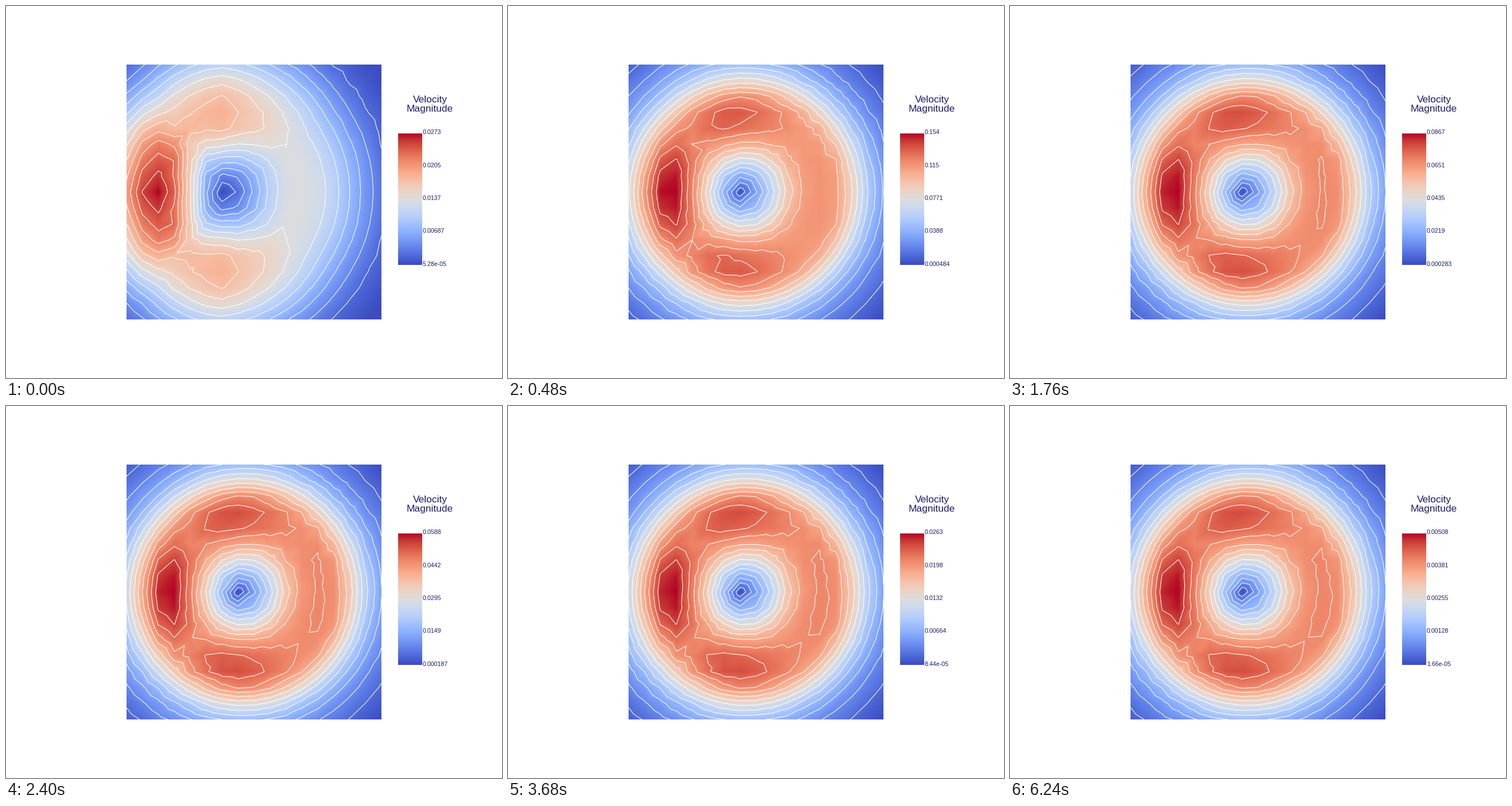
A matplotlib script that plays this animation: 864 by 648 pixels, repeating every 6400 ms.

```python
import numpy as np
import matplotlib.pyplot as plt
from matplotlib.animation import FuncAnimation
from matplotlib.tri import Triangulation

W, H, DPI = 864, 648, 100
FRAMES, INTERVAL = 40, 160
LEFT, RIGHT, TOP, BOTTOM = 210, 654, 102, 546
CELLS = 16
INK = "#1b1b68"
LEVELS = np.arange(1, 14) / 14

# Highest and lowest speed at a few key frames
KEYS = np.array([0, 3, 7, 15, 23, 31, 39])
PEAKS = np.array([0.02732, 0.1538, 0.1251, 0.05884, 0.02632, 0.011585, 0.00508])
LOWS = np.array([5.28e-5, 4.84e-4, 4.19e-4, 1.87e-4, 8.44e-5, 3.76e-5, 1.66e-5])
DECAY, LIMIT = 0.103, 0.2835


def swirl(z, speed):
    """Velocity turning around the origin, as complex numbers."""
    return 1j * speed * np.exp(1j * np.angle(z))


def start_flow(p):
    """One-sided vortex, squeezed and strongest on its left."""
    z = p - (376.5 + 324j)
    z = np.where(z.real < 0, 1.2, 1) * z.real + 1j * z.imag
    turn = np.abs(np.degrees(np.angle(z)))
    strength = np.interp(turn, [0, 35, 90, 130, 150, 180],
                         [.50, .50, .695, .65, .88, 1])
    ring = np.interp(np.abs(z),
                     [0, 28, 55, 83, 111, 130, 166, 194, 221, 248, 290, 340],
                     [0, .17, .45, .75, .95, 1, .93, .78, .58, .37, .13, 0])
    return swirl(z, strength * ring)


def settled_flow(p):
    """Round vortex with four lobes, the left one strongest."""
    z = p - (404.25 + 324j)
    z = z - 11 * np.minimum(np.abs(z) / 60, 1)
    r, turn = np.abs(z), np.angle(z)
    ring = np.interp(r, [0, 57, 84, 105, 130, 150, 165, 175, 197, 220, 250, 286, 325],
                     [0, .48, .68, .74, .755, .755, .735, .665, .485, .30, .16, .07, 0])
    lobes = np.abs(np.cos(2 * turn)) * (0.13 - 0.11 * np.cos(turn))
    return swirl(z, ring + lobes * np.exp(-((r - 132) / 36) ** 2))


def speed_range(k):
    gap = np.log(1 - PEAKS * np.exp(DECAY * KEYS) / LIMIT)
    peak = LIMIT * np.exp(-DECAY * k) * (1 - np.exp(np.interp(k, KEYS, gap)))
    return peak * np.interp(k, KEYS, LOWS / PEAKS), peak


# Mesh: square cells split from bottom left to top right
xs = np.linspace(LEFT, RIGHT, CELLS + 1)
ys = np.linspace(TOP, BOTTOM, CELLS + 1)
gx, gy = np.meshgrid(xs, ys)
tl = (np.arange(CELLS)[:, None] * (CELLS + 1) + np.arange(CELLS)).ravel()
tr, bl, br = tl + 1, tl + CELLS + 1, tl + CELLS + 2
mesh = Triangulation(gx.ravel(), gy.ravel(),
                     np.r_[np.c_[tl, tr, bl], np.c_[br, bl, tr]])
START = start_flow(gx + 1j * gy)
SETTLED = settled_flow(gx + 1j * gy)


def speed_field(k):
    share = (1 + k) ** -1.45
    speed = np.abs(share * START + (1 - share) * SETTLED)
    return (speed - speed.min()) / np.ptp(speed)


# Place of every pixel inside its cell
size = RIGHT - LEFT
pos = (np.arange(size) + 0.5) / size * CELLS
cell = pos.astype(int)
S, T = np.meshgrid(pos - cell, pos - cell)
COL, ROW = np.meshgrid(cell, cell)


def shade(z):
    a, b = z[ROW, COL], z[ROW, COL + 1]
    c, d = z[ROW + 1, COL], z[ROW + 1, COL + 1]
    upper = a + (b - a) * S + (c - a) * T
    lower = d + (c - d) * (1 - S) + (b - d) * (1 - T)
    return np.where(S + T < 1, upper, lower)


fig = plt.figure(figsize=(W / DPI, H / DPI), dpi=DPI, facecolor="white")
ax = fig.add_axes([0, 0, 1, 1])
ax.axis("off")


def picture(data, extent):
    return ax.imshow(data, cmap="coolwarm", vmin=0, vmax=1, extent=extent,
                     aspect="auto", interpolation="nearest")


def text(x, y, s, px, **kw):
    return ax.text(x, y, s, fontsize=px * 72 / DPI, color=INK,
                   family="Liberation Sans", va="baseline", **kw)


image = picture(shade(speed_field(0)), (LEFT, RIGHT, BOTTOM, TOP))
picture(np.linspace(1, 0, 229)[:, None], (683, 725, 451, 222))
text(738.5, 168, "Velocity", 17.4, ha="center")
text(738.5, 184, "Magnitude", 17.4, ha="center")
labels = [text(726, 452.8 - 57.4 * i, "", 10.6) for i in range(5)]
lines = []


def update(k):
    z = speed_field(k)
    image.set_data(shade(z))
    while lines:
        lines.pop().remove()
    lines.append(ax.tricontour(mesh, z.ravel(), levels=LEVELS,
                               colors="white", linewidths=0.75))
    ax.set_xlim(0, W)
    ax.set_ylim(H, 0)
    low, peak = speed_range(k)
    for i, label in enumerate(labels):
        label.set_text(f"{low + (peak - low) * i / 4:#.3g}")
    return [image, *labels]


anim = FuncAnimation(fig, update, frames=FRAMES, interval=INTERVAL,
                     init_func=lambda: update(0), repeat=True, repeat_delay=0)
plt.show()
```
